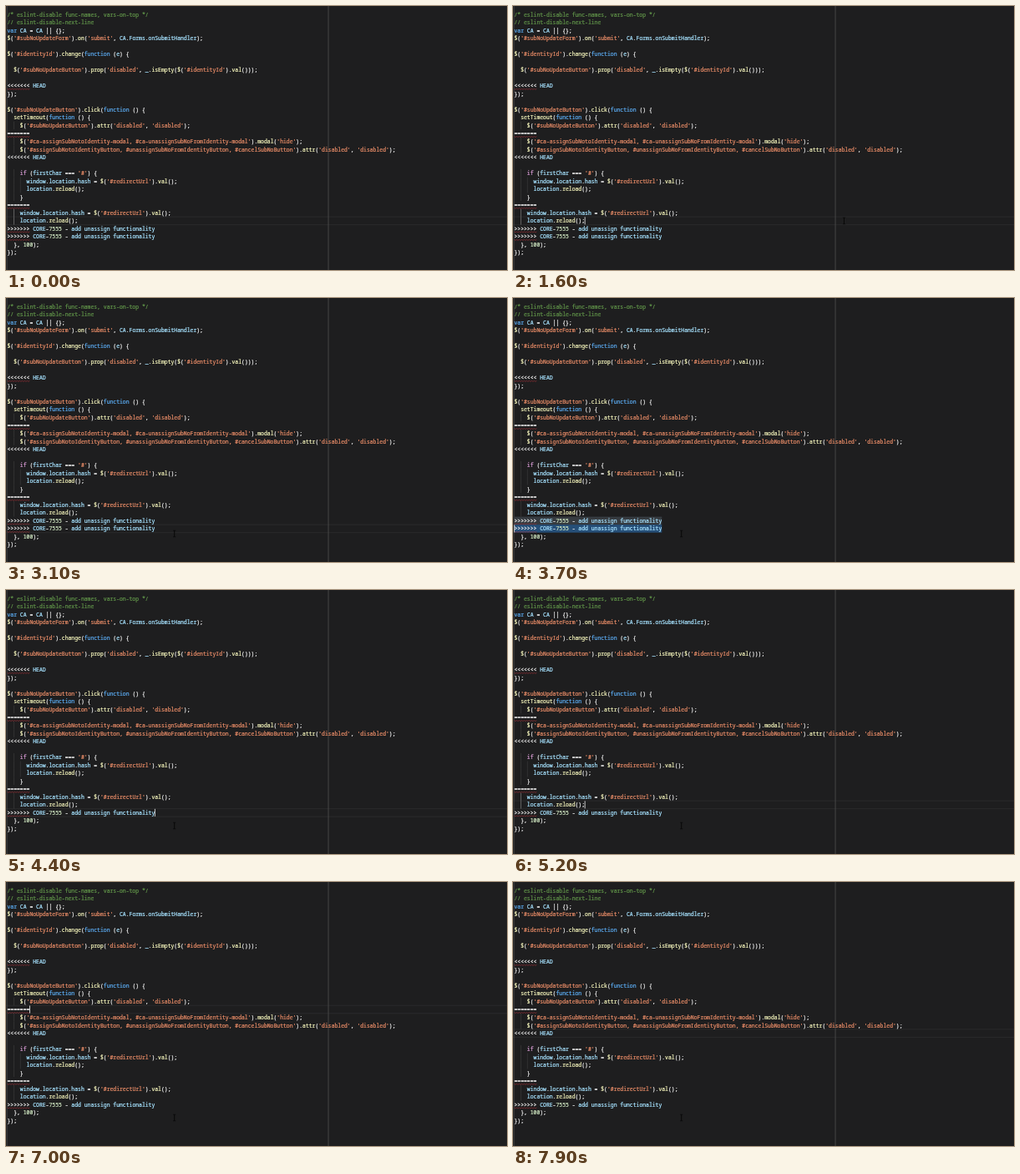
Animation, 600 px wide and 317 px high, one loop 8 s. Source, as an HTML page with a canvas:

```html
<!DOCTYPE html>
<html lang="en">
<head>
<meta charset="utf-8">
<title>Code editor</title>
<style>
  html, body { margin: 0; width: 100%; height: 100%; overflow: hidden; background: #1e1e1f; }
  canvas { display: block; width: 600px; height: 317px; }
</style>
</head>
<body>
<canvas id="stage"></canvas>
<script>
const W = 600, H = 317, LOOP = 8000;
const LEFT = 1.5, TOP = 5.3, CHAR = 3.843, ROW = 9.53;
const ZOOM = 10; // text is laid out large and scaled down for exact advances

const canvas = document.getElementById('stage');
const ctx = canvas.getContext('2d');
const dpr = window.devicePixelRatio || 1;
canvas.width = W * dpr;
canvas.height = H * dpr;

const MARKER = '>>>>>>> CORE-7555 - add unassign functionality';
const CODE = `/* eslint-disable func-names, vars-on-top */
// eslint-disable-next-line
var CA = CA || {};
$('#subNoUpdateForm').on('submit', CA.Forms.onSubmitHandler);

$('#identityId').change(function (e) {

  $('#subNoUpdateButton').prop('disabled', _.isEmpty($('#identityId').val()));

<<<<<<< HEAD
});

$('#subNoUpdateButton').click(function () {
  setTimeout(function () {
    $('#subNoUpdateButton').attr('disabled', 'disabled');
=======
    $('#ca-assignSubNotoIdentity-modal, #ca-unassignSubNoFromIdentity-modal').modal('hide');
    $('#assignSubNotoIdentityButton, #unassignSubNoFromIdentityButton, #cancelSubNoButton').attr('disabled', 'disabled');
<<<<<<< HEAD

    if (firstChar === '#') {
      window.location.hash = $('#redirectUrl').val();
      location.reload();
    }
=======
    window.location.hash = $('#redirectUrl').val();
    location.reload();
${MARKER}
${MARKER}
  }, 100);
});`.split('\n');

const LAST = 28;                      // the duplicate marker line
const SELECT = 3300, CLEAR = 3900, JOIN = 4200;
const cleared = CODE.map((s, i) => i === LAST ? '' : s);
const joined = CODE.filter((s, i) => i !== LAST);

const RULES = [
  [/^(\/\*.*?\*\/|\/\/.*)/, '#5f9148'],
  [/^'[^']*'/, '#e58a66'],
  [/^(var|function)\b/, '#5aa9ee'],
  [/^if\b/, '#d79ad2'],
  [/^\d+/, '#cfe6c0'],
  [/^[$\w]+(?=\()/, '#f0f0b8'],
  [/^[$\w]+/, '#a6e2ff'],
  [/^\s+/, null],
  [/^[^\s\w$'\/]+/, '#f0f0f0'],
  [/^./, '#f0f0f0']
];

function tokenize(line) {
  const out = [];
  for (let col = 0; col < line.length;) {
    const rest = line.slice(col);
    const [re, color] = RULES.find(([r]) => r.test(rest));
    const text = rest.match(re)[0];
    if (color) out.push({ col, text, color });
    col += text.length;
  }
  return out;
}

const tokens = new Map(['', ...CODE].map(s => [s, tokenize(s)]));

// Caret rows over time: [ms, row]
const moves = [[-500, 26], [2400, 28], [SELECT, 28], [CLEAR, 28], [JOIN, 27], [4800, 26]];
for (let i = 0; i < 12; i++) moves.push([5350 + i * 60, 25 - i]);
moves.push([6250, 13], [6400, 12], [6750, 13], [6850, 14], [6950, 15], [7050, 16], [7150, 17], [7300, 18]);

// Pointer path: [ms, x, y]
const path = [[1000, 478, 290], [1600, 396.5, 258], [2350, 201.7, 283]];

const xOf = col => LEFT + col * CHAR;
const yOf = row => TOP + row * ROW;
const indentOf = s => s.search(/\S|$/);

function rect(x, y, w, h, color) {
  ctx.fillStyle = color;
  ctx.fillRect(x, y, w, h);
}

function drawGuides(lines, row) {
  const level = indentOf(lines[row]);
  let from = row, to = row;
  while (level && indentOf(lines[from - 1]) >= level) from--;
  while (level && indentOf(lines[to + 1]) >= level) to++;
  lines.forEach((line, r) => {
    for (let col = 2; col < indentOf(line); col += 2) {
      const active = col === level - 2 && r >= from && r <= to;
      rect(xOf(col), yOf(r), 0.8, ROW, active ? '#707070' : '#363636');
    }
  });
}

function drawText(lines) {
  ctx.save();
  ctx.scale(1 / ZOOM, 1 / ZOOM);
  ctx.font = `500 ${CHAR / 0.6 * ZOOM}px "Noto Sans Mono", "DejaVu Sans Mono", monospace`;
  ctx.textBaseline = 'alphabetic';
  ctx.lineJoin = 'round';
  ctx.lineWidth = 0.24 * ZOOM; // thickens the thin strokes
  lines.forEach((line, r) => {
    for (const { col, text, color } of tokens.get(line)) {
      const x = xOf(col) * ZOOM, y = (yOf(r) + 7.2) * ZOOM;
      ctx.fillStyle = ctx.strokeStyle = color;
      ctx.fillText(text, x, y);
      ctx.strokeText(text, x, y);
    }
  });
  ctx.restore();
}

// Conflict markers nested inside a skipped block get no error underline.
function drawErrors(lines) {
  let skipping = false;
  ctx.strokeStyle = '#a83238';
  ctx.lineWidth = 0.6;
  lines.forEach((line, r) => {
    const mark = line.match(/^(<{7}|={7}|>{7})/);
    if (!mark || (skipping && mark[0][0] === '<')) return;
    skipping = mark[0][0] === '=';
    ctx.beginPath();
    for (let i = 0; i <= 18; i++) {
      ctx.lineTo(LEFT + i * 7 * CHAR / 18, yOf(r) + 8.8 + (i % 2 ? 0.5 : -0.5));
    }
    ctx.stroke();
  });
}

function drawPointer(t) {
  if (t < path[0][0]) return;
  let [, x, y] = path[path.length - 1];
  for (let i = 0; i + 1 < path.length; i++) {
    const [t0, x0, y0] = path[i], [t1, x1, y1] = path[i + 1];
    if (t < t0 || t >= t1) continue;
    const k = (t - t0) / (t1 - t0), e = k * k * (3 - 2 * k);
    x = x0 + (x1 - x0) * e;
    y = y0 + (y1 - y0) * e;
  }
  rect(x - 0.5, y - 4, 1, 8, '#080808');
  rect(x - 1.6, y - 4.2, 3.2, 0.7, '#080808');
  rect(x - 1.6, y + 3.5, 3.2, 0.7, '#080808');
}

function draw(t) {
  const lines = t < CLEAR ? CODE : t < JOIN ? cleared : joined;
  const [since, row] = moves.filter(m => m[0] <= t).pop();
  const selected = t >= SELECT && t < CLEAR;

  ctx.setTransform(dpr, 0, 0, dpr, 0, 0);
  rect(0, 0, W, H, '#1e1e1f');
  if (selected) {
    const width = MARKER.length * CHAR;
    rect(LEFT, yOf(LAST - 1), width, ROW, '#363b40');
    rect(LEFT, yOf(LAST), width, ROW, '#264f78');
  } else {
    rect(0, yOf(row) - 0.5, W, 1, '#2a2a2b');
    rect(0, yOf(row + 1) - 0.5, W, 1, '#2a2a2b');
  }
  rect(0.8, 0, 0.8, H, '#444');
  rect(xOf(100) - 0.2, 0, 0.9, H, '#4a4a4a');
  drawGuides(lines, row);
  drawErrors(lines);
  drawText(lines);

  if (Math.floor((t - since) / 500) % 2 === 0) {
    const col = selected ? 0 : Math.min(MARKER.length, lines[row].length);
    rect(xOf(col) - 0.4, yOf(row) + 0.2, 1, ROW - 0.4, '#c8c8c8');
  }
  drawPointer(t);
}

const start = performance.now();
function tick() {
  draw((performance.now() - start) % LOOP);
  requestAnimationFrame(tick);
}
tick();
</script>
</body>
</html>
```
